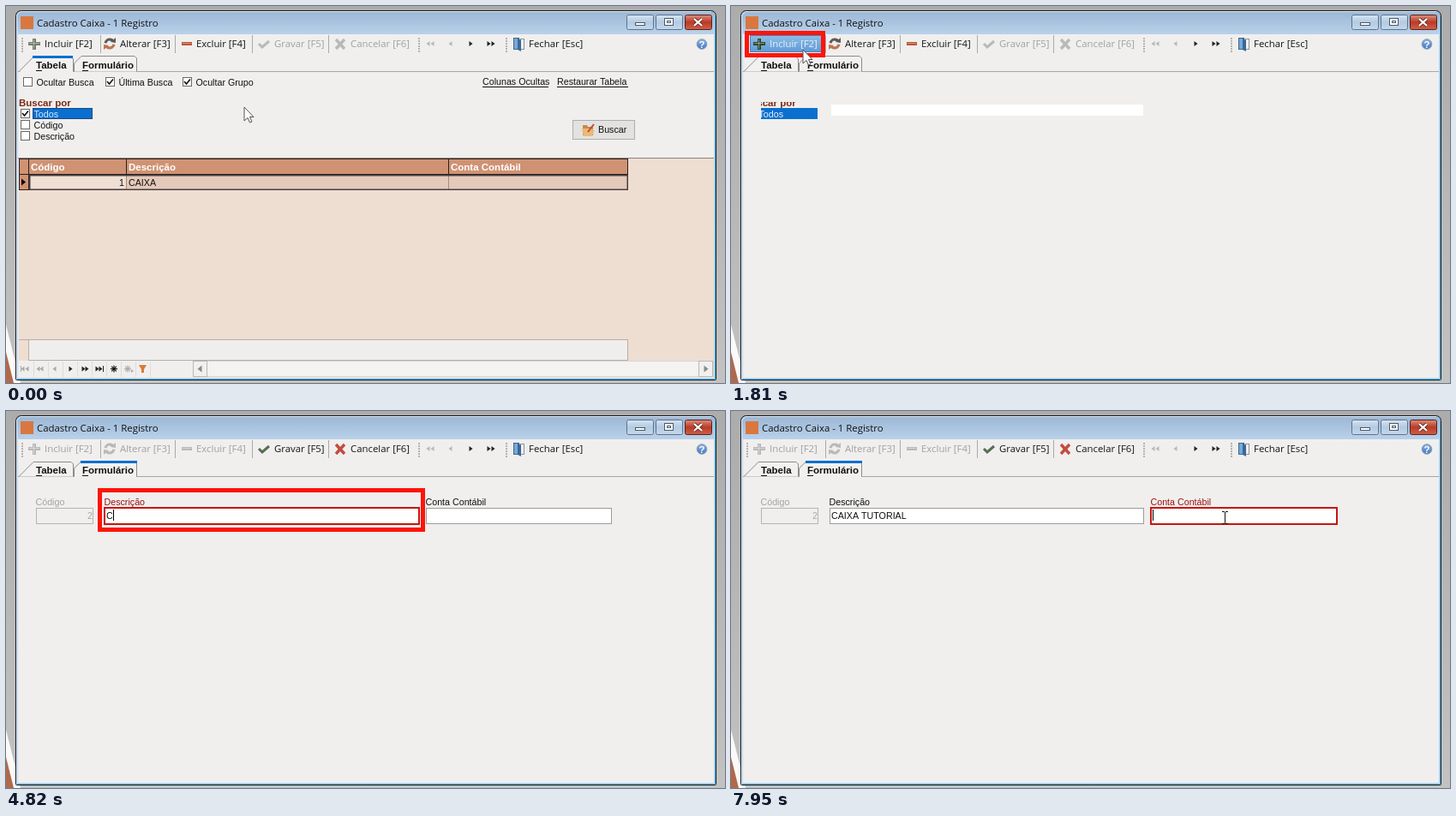
An HTML page with a canvas that plays this animation: 839x440 px, repeating every 8000 ms.

```html
<!DOCTYPE html>
<html lang="pt-BR">
<head>
<meta charset="utf-8">
<title>Cadastro Caixa</title>
<style>
html, body { margin: 0; width: 100%; height: 100%; overflow: hidden; background: #b4b3b4; }
canvas { display: block; }
</style>
</head>
<body>
<canvas id="stage" width="839" height="440"></canvas>
<script>
const ctx = document.getElementById('stage').getContext('2d');
const LOOP = 8000, BLANK_AT = 1740, FORM_AT = 1880, NEXT_AT = 7070;
const UI = '11.4px "Open Sans", "Noto Sans", sans-serif';
const SMALL = '10.7px "Liberation Sans", Arial, sans-serif';
const BOLD = 'bold 11.5px "Liberation Sans", Arial, sans-serif';
const OFF = '#b9b9b9', PANEL = '#f0efee', BLUE = '#0b6fcf', RED = '#ff1408';

// Drawing helpers
function fill(x, y, w, h, color) {
  ctx.fillStyle = color;
  ctx.fillRect(x, y, w, h);
}
function frame(x, y, w, h, color, lw = 1) {
  ctx.strokeStyle = color;
  ctx.lineWidth = lw;
  ctx.strokeRect(x + lw / 2, y + lw / 2, w - lw, h - lw);
}
function path(points, close) {
  ctx.beginPath();
  points.forEach(([x, y]) => ctx.lineTo(x, y));
  if (close) ctx.closePath();
}
function poly(points, color) {
  path(points, true);
  ctx.fillStyle = color;
  ctx.fill();
}
function line(points, color, lw = 1) {
  path(points);
  ctx.strokeStyle = color;
  ctx.lineWidth = lw;
  ctx.stroke();
}
function text(s, x, y, color = '#111', font = SMALL, align = 'left') {
  ctx.font = font;
  ctx.textAlign = align;
  ctx.fillStyle = color;
  ctx.fillText(s, x, y);
}
function vGrad(y0, y1, ...colors) {
  const g = ctx.createLinearGradient(0, y0, 0, y1);
  colors.forEach((c, i) => g.addColorStop(i / (colors.length - 1), c));
  return g;
}
function tri(x, y, dir, color, size = 3) {
  poly([[x - dir * size / 2, y - size], [x + dir * size / 2 + dir, y], [x - dir * size / 2, y + size]], color);
}
function underline(x, y, w, color = '#111') { fill(x, y, w, 1, color); }

// Timing helpers
const clamp = v => Math.max(0, Math.min(1, v));
const span = (t, a, b) => clamp((t - a) / (b - a));
const ease = v => v * v * (3 - 2 * v);

const moves = [
  [0, 278, 118], [70, 278, 118], [910, 171, 106], [1560, 85, 50],
  [1900, 84, 51], [2490, 156, 117], [2770, 160, 121]
];
function pointer(t) {
  const i = moves.findIndex(m => m[0] > t);
  if (i < 0) return [160, 121];
  const [t0, x0, y0] = moves[i - 1], [t1, x1, y1] = moves[i];
  const k = ease(span(t, t0, t1));
  return [x0 + (x1 - x0) * k, y0 + (y1 - y0) * k];
}

const PHRASE = 'CAIXA TUTORIAL';
const keyTimes = [4820, 4900, 5050, 5170, 5300, 5450, 5850, 5950, 6060, 6200, 6400, 6480, 6560, 6670];
const typed = t => PHRASE.slice(0, keyTimes.filter(k => k <= t).length);

function backdrop() {
  fill(0, 0, 839, 440, vGrad(0, 440, '#adacad', '#c3c2c3'));
  poly([[0, 372], [17, 440], [0, 440]], '#fbfaf9');
  poly([[0, 404], [9, 440], [0, 440]], '#b0694b');
}

function windowButton(x, top, mid, low, border) {
  ctx.beginPath();
  ctx.roundRect(x + .5, 10.5, 31, 17, 2);
  ctx.fillStyle = vGrad(10, 28, top, mid, low);
  ctx.fill();
  ctx.strokeStyle = border;
  ctx.lineWidth = 1;
  ctx.stroke();
}

function windowFrame() {
  ctx.beginPath();
  ctx.roundRect(11.5, 5.5, 817, 431, [6, 6, 1, 1]);
  ctx.fillStyle = vGrad(6, 33, '#9bb7d5', '#b9d1ea');
  ctx.fill();
  ctx.strokeStyle = '#15191e';
  ctx.lineWidth = 1;
  ctx.stroke();
  line([[12.5, 435], [12.5, 11], [17, 6.5], [823, 6.5]], '#e4eef8');
  line([[827.5, 11], [827.5, 435.5], [13, 435.5]], '#55bfe8');
  fill(14, 33, 812, 401, PANEL);
  fill(17, 12, 15, 15, '#d9773f');
  text('Cadastro Caixa - 1 Registro', 36, 24, '#111', UI);
  for (const x of [724, 758]) windowButton(x, '#d8e6f4', '#b3cae2', '#c6daee', '#5f7288');
  windowButton(792, '#dd9484', '#bb3a25', '#d0654c', '#5b2019');
  fill(734, 19, 12, 4, '#fff');
  frame(734, 19, 12, 4, '#4b5968');
  fill(768, 14, 11, 9, '#fff');
  frame(768, 14, 11, 9, '#4b5968');
  frame(771, 17, 5, 3, '#4b5968');
  for (const [c, w] of [['#682b24', 4], ['#fff', 2.3]]) {
    line([[803, 15], [812, 23]], c, w);
    line([[812, 15], [803, 23]], c, w);
  }
}

function grip(x) {
  for (let y = 37; y < 53; y += 3) fill(x, y, 2, 2, '#b3b3b3');
}

function plusIcon(color) {
  fill(31, 38, 4, 13, color);
  fill(26, 42, 14, 4, color);
  fill(32, 39, 1, 11, 'rgba(255,255,255,.4)');
  fill(27, 43, 12, 1, 'rgba(255,255,255,.4)');
}

function refreshIcon(on) {
  const top = on ? '#5f5a56' : OFF, low = on ? '#bd7450' : OFF;
  ctx.lineWidth = 3.2;
  for (const [color, from, to] of [[top, 1.05, 1.8], [low, .05, .8]]) {
    ctx.strokeStyle = color;
    ctx.beginPath();
    ctx.arc(121, 44, 5, Math.PI * from, Math.PI * to);
    ctx.stroke();
  }
  poly([[128, 37], [128, 43], [122, 42]], top);
  poly([[114, 51], [114, 45], [120, 46]], low);
}

function doorIcon() {
  fill(600, 38, 5, 13, '#eef1f4');
  frame(600, 38, 5, 13, '#8a929c');
  fill(592, 38, 6, 12, '#77a9d8');
  frame(592, 37, 7, 14, '#41658f');
  poly([[597, 37], [601, 40], [601, 53], [597, 51]], '#3c6896');
}

function toolbar(form, hot) {
  const edit = form ? '#a1a1a1' : '#161616', save = form ? '#161616' : '#a1a1a1';
  grip(18);
  if (hot) {
    fill(22, 34, 84, 20, vGrad(34, 54, '#8fbbe5', '#5e9bd6'));
    frame(22, 34, 84, 20, '#4a83bd');
  }
  plusIcon(form ? OFF : hot ? '#2f4a27' : '#747d6e');
  text('Incluir [F2]', 45, 48, hot ? '#e6f1fb' : edit, UI);
  refreshIcon(!form);
  text('Alterar [F3]', 133, 48, edit, UI);
  fill(205, 42, 12, 4, form ? OFF : '#bd5638');
  fill(206, 43, 10, 1, 'rgba(255,255,255,.35)');
  text('Excluir [F4]', 222, 48, edit, UI);
  line([[295, 44], [299, 48], [307, 41]], form ? '#566e50' : OFF, 3);
  text('Gravar [F5]', 313, 48, save, UI);
  const cross = form ? '#c44b3f' : OFF;
  line([[385, 39], [395, 50]], cross, 3.4);
  line([[395, 39], [385, 50]], cross, 3.4);
  text('Cancelar [F6]', 402, 48, save, UI);
  for (const x of [110, 197, 287, 376]) fill(x, 34, 1, 21, '#aaa');
  grip(481);
  for (const [x, dir, color] of [[493, -1, OFF], [498, -1, OFF], [519, -1, OFF], [542, 1, '#222'], [563, 1, '#222'], [568, 1, '#222']])
    tri(x, 44, dir, color);
  grip(583);
  doorIcon();
  text('Fechar [Esc]', 610, 48, '#161616', UI);
  ctx.beginPath();
  ctx.arc(812, 44.5, 5.8, 0, 7);
  ctx.fillStyle = vGrad(38, 51, '#8db6e8', '#3e74bd');
  ctx.fill();
  ctx.strokeStyle = '#8799b0';
  ctx.lineWidth = 1;
  ctx.stroke();
  text('?', 812, 48.5, '#fff', BOLD, 'center');
}

function tabs(active) {
  const edge = '#8b8b8b';
  line([[14, 76.5], [826, 76.5]], '#a7a7a7');
  const left = [[15, 76.5], [32, 59.5], [76, 59.5], [78.5, 62], [78.5, 76.5]];
  const right = [[79.5, 76.5], [79.5, 67], [88, 58.5], [150, 58.5], [152.5, 61], [152.5, 76.5]];
  for (const shape of [left, right]) {
    poly(shape, '#f2f1f0');
    line(shape, edge);
  }
  if (active === 'table') {
    fill(17, 76, 61, 1, PANEL);
    fill(31, 58, 47, 3, BLUE);
  }
  if (active === 'form') {
    fill(80, 76, 72, 1, PANEL);
    fill(87, 58, 66, 3, BLUE);
  }
  text('Tabela', 35, 73, '#111', BOLD);
  underline(35, 75, 7);
  text('Formulário', 89, 73, '#111', BOLD);
  underline(89, 75, 7);
}

function checkbox(x, y, on) {
  fill(x, y, 11, 11, '#fff');
  frame(x, y, 11, 11, '#6a6a6a');
  if (on) line([[x + 2, y + 5], [x + 4.5, y + 8], [x + 9, y + 2.5]], '#111', 1.6);
}

function searchPanel() {
  [['Ocultar Busca', 20, false], ['Última Busca', 116, true], ['Ocultar Grupo', 206, true]].forEach(([s, x, on]) => {
    checkbox(x, 83, on);
    text(s, x + 15.5, 93);
  });
  text('Colunas Ocultas', 556, 92);
  underline(556, 94, 77);
  text('Restaurar Tabela', 643, 92);
  underline(643, 94, 83);
  text('Buscar por', 15, 117, '#7b2a14', BOLD);
  fill(31, 119, 70, 13, BLUE);
  frame(31, 119, 70, 13, '#174a80');
  ['Todos', 'Código', 'Descrição'].forEach((s, i) => {
    checkbox(17, 120 + 13 * i, i === 0);
    text(s, 32.5, 130 + 13 * i, i ? '#111' : '#d7eaff');
  });
  fill(661, 133, 73, 23, '#e3e2e1');
  frame(661, 133, 73, 23, '#adadad');
  poly([[673, 139], [678, 139], [679, 141], [685, 141], [685, 151], [673, 151]], '#c58a4d');
  poly([[672, 143], [683, 143], [687, 146], [683, 152], [674, 152]], '#eab978');
  line([[679, 147], [686, 138]], '#c64a2d', 2);
  text('Buscar', 691, 148);
}

function grid() {
  fill(14, 177, 812, 1, '#8b8580');
  fill(15, 178, 811, 236, '#eeddd1');
  fill(15, 178, 711, 19, '#cf9273');
  for (const y of [178, 196]) fill(15, y, 711, 1, '#2c201b');
  for (const x of [15, 26, 140, 516, 725]) fill(x, 178, 1, 19, '#2c201b');
  [['Código', 29], ['Descrição', 143], ['Conta Contábil', 519]].forEach(([s, x]) => text(s, x, 192, '#fff', BOLD));
  fill(15, 197, 12, 18, '#cf9273');
  frame(15, 196, 12, 19, '#2c201b');
  tri(20, 205.5, 1, '#000', 4);
  fill(27, 197, 698, 17, '#e5c9ba');
  fill(28, 198, 112, 15, '#f0dfd4');
  fill(140, 197, 1, 17, '#a88c7e');
  fill(516, 197, 1, 17, '#a88c7e');
  frame(27, 197, 699, 18, '#464044', 1.5);
  text('1', 138, 210, '#111', SMALL, 'right');
  text('CAIXA', 143, 210);
  fill(27, 389, 699, 25, '#efeeec');
  frame(26, 389, 700, 25, '#b8aea7');
  fill(15, 389, 11, 1, '#b8aea7');
  recordBar();
}

function recordBar() {
  fill(14, 414, 812, 20, PANEL);
  for (let x = 32; x < 170; x += 17) fill(x, 415, 1, 18, '#dedddc');
  const y = 423.5;
  const arrows = [[20, -1, 0], [25, -1, 0], [38, -1, 0], [42, -1, 0], [57, -1, 0], [75, 1, 1], [90, 1, 1], [94, 1, 1], [106, 1, 1], [110, 1, 1]];
  for (const [x, dir, on] of arrows) tri(x, y, dir, on ? '#222' : '#aaa');
  fill(17, 420, 1, 7, '#aaa');
  fill(113, 420, 1, 7, '#222');
  for (const [x, c] of [[126, '#111'], [142, '#aaa']])
    for (let a = 0; a < Math.PI; a += Math.PI / 4) {
      const dx = Math.cos(a) * 4, dy = Math.sin(a) * 4;
      line([[x - dx, y - dy], [x + dx, y + dy]], c, 1.2);
    }
  tri(147, 426, 1, '#aaa', 2);
  poly([[155, 419], [164, 419], [161, 424], [161, 428], [158, 428], [158, 424]], '#d87b36');
  fill(218, 415, 608, 18, '#f4f3f2');
  frame(218, 414, 608, 19, '#d8d7d6');
  for (const [x, dir] of [[218, -1], [808, 1]]) {
    fill(x, 414, 17, 19, '#f1f0ef');
    frame(x, 414, 17, 19, '#b9b8b7');
    tri(x + 8.5, y, dir, '#8a8a8a', 4);
  }
}

// Half-cleared page shown while the form opens
function blankPage() {
  ctx.save();
  ctx.beginPath();
  ctx.rect(35, 112, 66, 20);
  ctx.clip();
  text('Buscar por', 15, 117, '#7b2a14', BOLD);
  fill(35, 119, 66, 13, BLUE);
  text('Todos', 32.5, 130, '#e6f2ff');
  ctx.restore();
  fill(117, 115, 364, 13, '#fff');
}

function field(label, x, w, value, focus, caret) {
  text(label, x - .5, 110, focus ? '#9c1010' : '#111');
  fill(x, 113, w, 19, '#fff');
  if (focus) frame(x - 1, 112, w + 2, 21, '#c4170f', 2);
  else frame(x, 113, w, 19, '#9c9c9c');
  text(value, x + 2, 126);
  if (focus && caret) fill(Math.round(x + 2 + ctx.measureText(value).width), 115, 1, 13, '#000');
}

function formPage(t) {
  text('Código', 34.5, 110, '#a3a3a3');
  frame(35, 113, 67, 19, '#b4b4b4');
  text('2', 101, 126, '#a8a8a8', SMALL, 'right');
  const next = t >= NEXT_AT;
  const caret = t >= 4820 || (t > 4090 && t < 4490);
  field('Descrição', 115, 367, typed(t), !next, caret);
  field('Conta Contábil', 490, 217, '', next, true);
}

// Outline drawn counterclockwise from its top left corner
function marker(x, y, w, h, progress, alpha) {
  if (progress <= 0 || alpha <= 0) return;
  const length = 2 * (w + h);
  ctx.save();
  ctx.globalAlpha = alpha;
  ctx.setLineDash([length * progress, length]);
  path([[x, y], [x, y + h], [x + w, y + h], [x + w, y]], true);
  ctx.strokeStyle = RED;
  ctx.lineWidth = 5;
  ctx.stroke();
  ctx.restore();
}

function arrow(x, y) {
  ctx.save();
  ctx.translate(Math.round(x), Math.round(y));
  const shape = [[0, 0], [0, 16], [4, 12.5], [6.5, 18], [9, 17], [6.5, 11.5], [11, 11.5]];
  poly(shape, '#fbfbfb');
  line([...shape, [0, 0]], '#555');
  ctx.restore();
}

function beam(x, y) {
  x = Math.round(x);
  y = Math.round(y);
  fill(x, y - 6, 1, 13, '#111');
  for (const dy of [-7, 7]) {
    fill(x - 3, y + dy, 3, 1, '#111');
    fill(x + 1, y + dy, 3, 1, '#111');
  }
}

function cursor(t) {
  if (t >= NEXT_AT) return beam(576, 124);
  if (t >= 4820) return;
  const [x, y] = pointer(t);
  if (t >= FORM_AT && x > 115 && y > 112) beam(x, y);
  else arrow(x, y);
}

function draw(t) {
  const form = t >= FORM_AT, blank = t >= BLANK_AT && !form;
  const [x, y] = pointer(t);
  const hot = !form && x > 22 && x < 106 && y > 34 && y < 54;
  backdrop();
  windowFrame();
  toolbar(form, hot);
  tabs(form ? 'form' : blank ? '' : 'table');
  if (form) formPage(t);
  else if (blank) blankPage();
  else {
    searchPanel();
    grid();
  }
  marker(18.5, 31.5, 89, 26, span(t, 40, 1045), 1 - span(t, 1980, 2120));
  marker(109.5, 92.5, 377, 46, span(t, 3000, 4090), 1 - span(t, 7810, 7950));
  cursor(t);
}

function tick() {
  draw(performance.now() % LOOP);
  requestAnimationFrame(tick);
}
tick();
</script>
</body>
</html>
```
